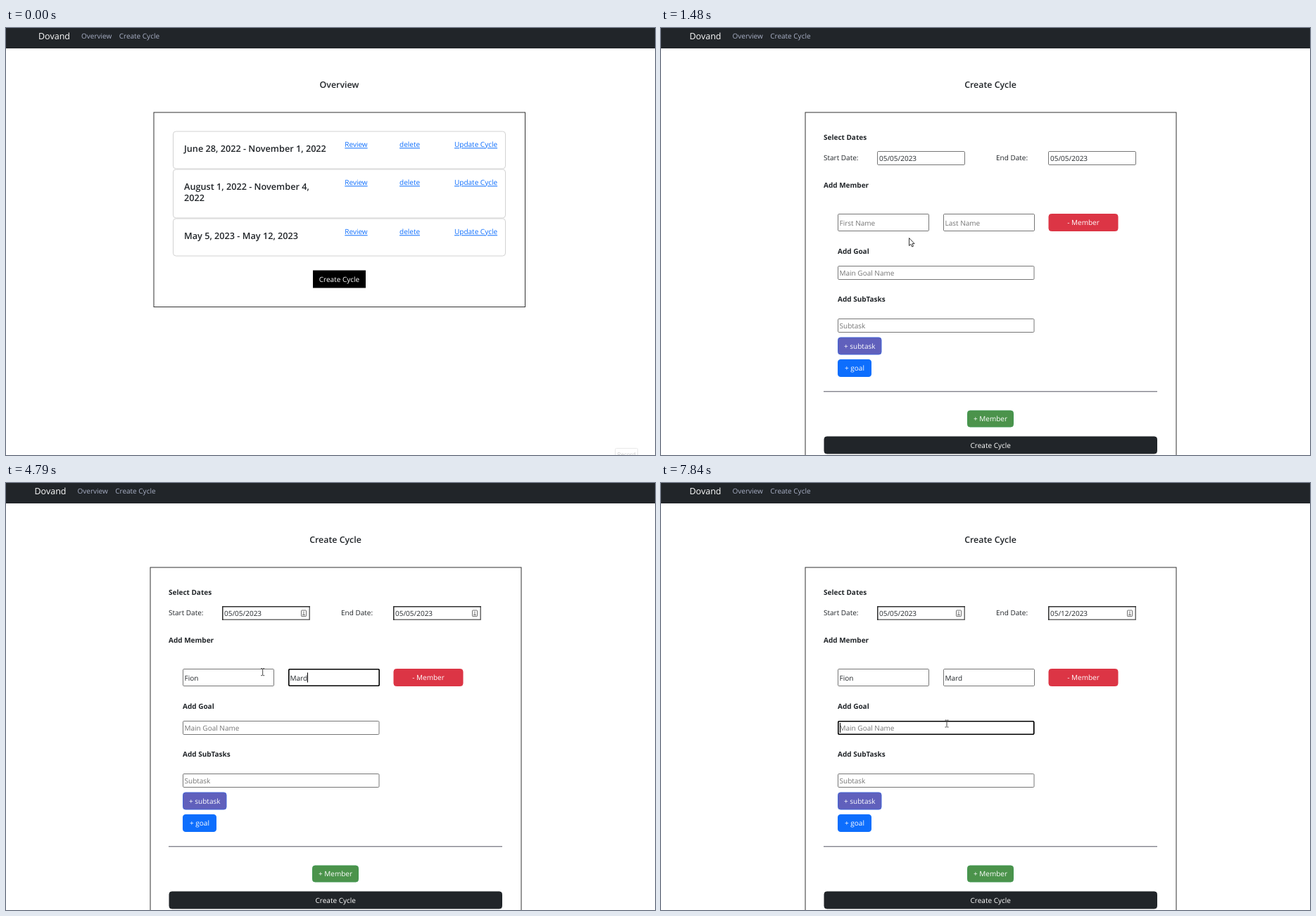
An HTML page for the animation above (8 s loop, 922 by 607 pixels).

```html
<!DOCTYPE html>
<html lang="en">
<head>
<meta charset="utf-8">
<title>Cycle planner</title>
<style>
html, body { margin: 0; width: 100%; height: 100%; overflow: hidden; background: #fff; }
svg { display: block; width: 922px; height: 607px; }
text { font: 10px "Open Sans", "Noto Sans", sans-serif; fill: #212529; white-space: pre; text-rendering: geometricPrecision; }
.brand { font-size: 12.5px; fill: #fff; }
.nav { fill: #a9b0c6; }
.head { font-size: 12.4px; font-weight: 600; }
.period { font-size: 12.7px; font-weight: 600; }
.bold { font-weight: 700; }
.mid { text-anchor: middle; }
.white { fill: #fff; }
.link { fill: #0d6efd; text-decoration: underline; }
.hint { fill: #757575; }
.cal { font: 8.45px "Liberation Sans", Arial, sans-serif; fill: #000; text-anchor: middle; }
.cal.bold { font-weight: 700; }
.cal.white { fill: #fff; }
.month { font-size: 9.95px; font-weight: 700; }
.record { font-size: 8px; fill: #ccc; text-anchor: middle; }
</style>
</head>
<body>
<svg id="stage" viewBox="0 0 922 607"></svg>
<script>
const LOOP = 8000, BLINK = 530;
const stage = document.getElementById('stage');

const text = (x, y, s, cls = '', id = '') =>
  `<text x="${x}" y="${y}" class="${cls}"${id && ` id="${id}"`}>${s}</text>`;
const rect = (x, y, x2, y2, fill, r = 0, stroke = 'none') => {
  const d = stroke === 'none' ? 0 : .5;
  return `<rect x="${x + d}" y="${y + d}" width="${x2 - x - 2 * d}" height="${y2 - y - 2 * d}" rx="${r}" fill="${fill}" stroke="${stroke}"/>`;
};
const line = (d, stroke, width = 1, fill = 'none') =>
  `<path d="${d}" fill="${fill}" stroke="${stroke}" stroke-width="${width}"/>`;
const group = (id, body) => `<g id="${id}">${body}</g>`;
const button = (x, y, x2, y2, fill, label, stroke = fill, r = 3.5) =>
  rect(x, y, x2, y2, fill, r, stroke) + text((x + x2) / 2, (y + y2) / 2 + 3.6, label, 'mid white');

const navbar = x => rect(0, 0, 922, 29, '#212529') + text(x, 16, 'Dovand', 'brand') +
  text(x + 61, 14.7, 'Overview', 'nav') + text(x + 114.7, 14.7, 'Create Cycle', 'nav');

// Overview page
const card = (y, y2, ...lines) => rect(237, y, 710, y2, '#fff', 4, '#d2d2d2') +
  lines.map((s, i) => text(253, y + 29.5 + 15.8 * i, s, 'period')).join('') +
  [[481.3, 'Review'], [559, 'delete'], [637, 'Update Cycle']]
    .map(([x, s]) => text(x, y + 22.8, s, 'link')).join('');

const overview = navbar(46) + text(473.5, 85, 'Overview', 'head mid') +
  rect(209.5, 119.5, 738, 397, 'none', 0, '#333') +
  card(146.5, 200.5, 'June 28, 2022 - November 1, 2022') +
  card(200.5, 270.5, 'August 1, 2022 - November 4,', '2022') +
  card(270.5, 324.5, 'May 5, 2023 - May 12, 2023') +
  button(436, 344.5, 511, 369.5, '#000', 'Create Cycle', '#000', 0) +
  group('record', rect(865, 597, 898, 614, '#fff', 2, '#e8e8e8') + text(881.5, 609, 'Record', 'record'));

// Form page: x, y, right, bottom, text inset, placeholder
const fields = {
  start: [307, 175, 432, 195, 3],
  end: [550, 175, 675, 195, 3],
  first: [251, 264, 381, 289, 2.5, 'First Name'],
  last: [401, 264, 531, 289, 2.5, 'Last Name'],
  goal: [251, 338, 530.5, 358, 2.5, 'Main Goal Name'],
  task: [251, 413, 530.5, 433, 2.5, 'Subtask']
};
const field = ([id, [x, y, x2, y2, pad]]) => rect(x, y, x2, y2, '#fff', 1.3, '#767676') +
  text(x + pad, (y + y2) / 2 + 4, '', '', id + 'Text');

// Inset border and contact icon that date fields receive
const filled = id => {
  const [x, y, x2, y2] = fields[id];
  return group(id + 'Fill', line(`M${x2 - .8} ${y}V${y2 - .8}H${x}`, '#6c6c6c', 1.5) +
    line(`M${x + .8} ${y2}V${y + .8}H${x2}`, '#303030', 1.5) +
    rect(x2 - 13, 180.5, x2 - 5, 190, '#fff', .6, '#707070') +
    line(`M${x2 - 9} 182.5v4.5M${x2 - 11} 187.5h4`, '#707070'));
};

const column = i => 565.5 + 21.42 * i;
const weeks = Array.from({ length: 35 }, (_, i) => {
  const day = i < 1 ? 30 : (i - 1) % 31 + 1, on = i === 5;
  const x = column(i % 7), y = 259.5 + 21.5 * Math.floor(i / 7);
  return (on ? rect(x - 9.3, y - 9.3, x + 9.3, y + 9.2, '#216ba5', 3) : '') +
    text(x, y + 3, day, on ? 'cal bold white' : 'cal');
}).join('');
const picker = rect(550, 202, 710, 361, '#fff', 3, '#aeaeae') +
  line('M550.5 244.5V205.5a3 3 0 0 1 3-3H706.5a3 3 0 0 1 3 3V244.5Z', '#aeaeae', 1, '#f0f0f0') +
  line('M619.5 203L625 197.5L630.5 203', '#aeaeae', 1, '#f0f0f0') +
  line('M566 207.5l-3.7 3.7 3.7 3.7M693.3 207.5l3.7 3.7-3.7 3.7', '#ccc', 1.8) +
  text(629.7, 218.5, 'May 2023', 'cal month') +
  ['Su', 'Mo', 'Tu', 'We', 'Th', 'Fr', 'Sa'].map((s, i) => text(column(i), 236, s, 'cal')).join('') + weeks;

const form = navbar(40.5) + text(468, 85, 'Create Cycle', 'head mid') +
  rect(204.5, 119.5, 732.5, 640, 'none', 0, '#333') +
  text(231, 158.5, 'Select Dates', 'bold') + text(231, 187.5, 'Start Date:') + text(476, 187.5, 'End Date:') +
  text(231, 227, 'Add Member', 'bold') + text(251, 320.7, 'Add Goal', 'bold') +
  text(251, 389.2, 'Add SubTasks', 'bold') +
  Object.entries(fields).map(field).join('') + filled('start') + filled('end') +
  button(550.5, 264, 649.5, 289, '#dc3545', '- Member') +
  button(251, 439.5, 313.5, 464.5, '#6060bc', '+ subtask', '#4467d8') +
  button(251, 471, 299, 496, '#0d6efd', '+ goal') +
  rect(231, 516, 705, 517.4, '#85858f') +
  button(435, 543.5, 501, 567.5, '#4b934b', '+ Member', '#3f9650') +
  button(231.5, 580.5, 705, 605.5, '#212529', 'Create Cycle') +
  '<rect id="ring" rx="1.5" fill="none" stroke="#000" stroke-width="1.6"/>' +
  '<path id="caret" stroke="#000"/>' + group('picker', picker);

const pointers =
  group('arrow', line('M0 0V11L2.5 8.8L4.2 12.5L6 11.7L4.4 8.1H7.6Z', '#222', .9, '#fff')) +
  group('beam', line('M-2.5-5H-.5M.5-5H2.5M0-4.7V4.7M-2.5 5H-.5M.5 5H2.5', '#444')) +
  group('hand', line('M-1.3 6V.8a1.2 1.2 0 0 1 2.4 0V4.5l4.2.9q1.2.4 1.2 1.6L5.8 11.5H-.8L-4 7.4q.3-1.6 1.6-.8Z', '#222', .9, '#fff'));

stage.innerHTML = group('overview', overview) + group('form', form) + group('pointer', pointers);

const el = id => document.getElementById(id);
const show = (id, on) => { el(id).style.display = on ? '' : 'none'; };

// Time tables
const focusSteps = [[0, ''], [1700, 'first'], [3380, 'last'], [5400, 'end'], [6300, ''], [6770, 'goal']];
const typing = {
  start: [[0, '05/05/2023']],
  end: [[0, '05/05/2023'], [6300, '05/12/2023']],
  first: [[0, ''], [2300, 'F'], [2500, 'Fi'], [2760, 'Fion']],
  last: [[0, ''], [3910, 'M'], [4110, 'Ma'], [4210, 'Mar'], [4310, 'Mard']],
  goal: [[0, '']],
  task: [[0, '']]
};
// time, x, y, number of jumps on the way there
const route = [
  [70, 880, 603], [740, 467, 355, 9], [880, 473.5, 364.5, 1], [1480, 352.5, 298.5, 9],
  [1640, 347, 281, 2], [1700, 346.5, 278.5, 1], [4720, 346.5, 278.5, 1], [5130, 592, 146, 6],
  [5400, 604.5, 187.5, 4], [5600, 604.5, 187.5, 1], [6150, 672.5, 281.5, 8], [6300, 672.5, 281.5, 1],
  [6370, 676, 286, 1], [6440, 676, 286, 1], [6760, 406, 342, 4]
];

const at = (steps, t) => steps.filter(s => s[0] <= t).pop();
const inside = (x, y, [l, t, r, b]) => x >= l && x <= r && y >= t && y <= b;

function pointerAt(t) {
  const i = route.findIndex(p => p[0] > t);
  if (i < 0) return route[route.length - 1].slice(1);
  if (i === 0) return route[0].slice(1);
  const [t0, x0, y0] = route[i - 1], [t1, x1, y1, n] = route[i];
  const p = Math.floor((t - t0) / (t1 - t0) * n) / n, k = p * p * (3 - 2 * p);
  return [x0 + (x1 - x0) * k, y0 + (y1 - y0) * k];
}

function drawPointer(t, onForm, open) {
  const [x, y] = pointerAt(t);
  const hand = onForm ? open && inside(x, y, [550, 245, 710, 361]) : inside(x, y, [436, 345, 511, 370]);
  const beam = onForm && !hand && Object.values(fields).some(f => inside(x, y, f));
  show('pointer', t >= 70);
  el('pointer').setAttribute('transform', `translate(${x} ${y})`);
  show('hand', hand);
  show('beam', beam);
  show('arrow', !hand && !beam);
}

function drawFocus(t) {
  const [since, id] = at(focusSteps, t);
  show('ring', id);
  show('caret', false);
  if (!id) return;
  const [x, y, x2, y2, pad] = fields[id];
  const ring = { x: x + .8, y: y + .8, width: x2 - x - 1.6, height: y2 - y - 1.6 };
  for (const k in ring) el('ring').setAttribute(k, ring[k]);

  const [typedAt, value] = at(typing[id], t);
  const node = el(id + 'Text');
  const count = id === 'end' ? 9 : value.length;
  const left = Math.round(x + pad + (count ? node.getSubStringLength(0, count) : 0)) + .5;
  const mid = (y + y2) / 2;
  el('caret').setAttribute('d', `M${left} ${mid - 7}V${mid + 7}`);
  show('caret', Math.floor((t - Math.max(since, typedAt)) / BLINK) % 2 === 0);
}

function draw(t) {
  const onForm = t >= 880, open = t >= 5400 && t < 6300;
  show('overview', !onForm);
  show('form', onForm);
  show('record', t < 70);
  show('startFill', t >= 1770);
  show('endFill', t >= 3380);
  show('picker', open);
  for (const id in fields) {
    const value = at(typing[id], t)[1], node = el(id + 'Text');
    const content = value || fields[id][5];
    if (node.textContent !== content) node.textContent = content;
    node.setAttribute('class', value ? '' : 'hint');
  }
  if (onForm) drawFocus(t);
  drawPointer(t, onForm, open);
}

const begin = performance.now();
function tick() {
  draw((performance.now() - begin) % LOOP);
  requestAnimationFrame(tick);
}
tick();
</script>
</body>
</html>
```
